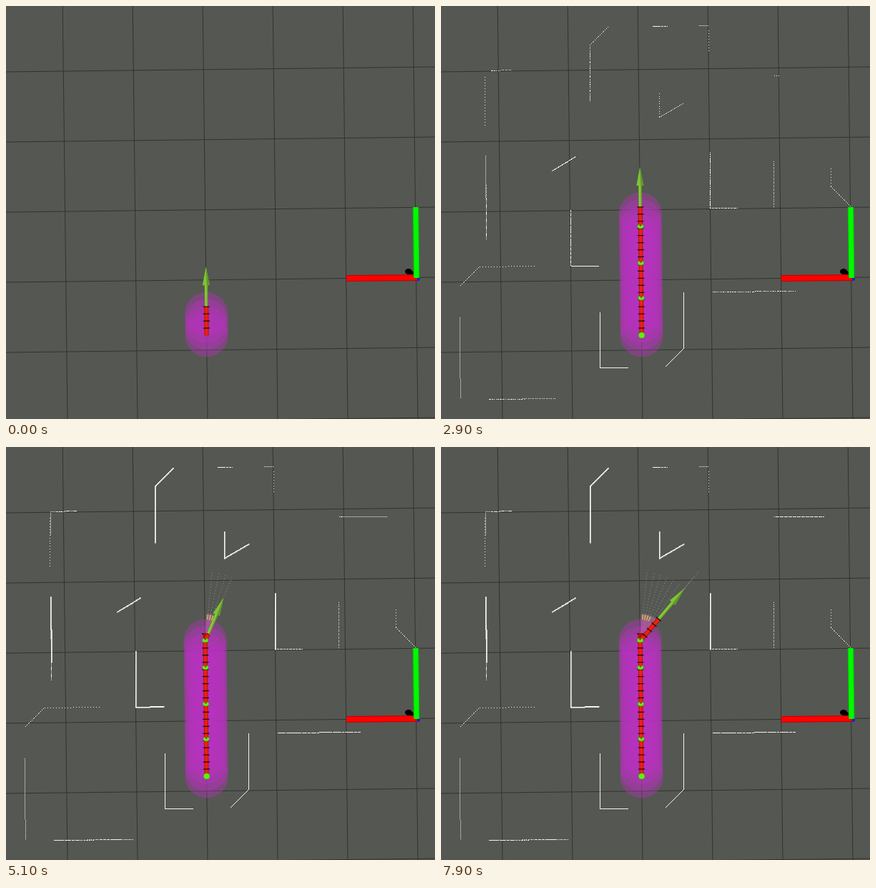
An HTML page with a canvas that plays this animation: 600 by 577 pixels, repeating every 8000 ms.

```html
<!DOCTYPE html>
<html>
<head>
<meta charset="utf-8">
<style>
html, body { margin: 0; width: 600px; height: 577px; overflow: hidden; background: #555752; }
canvas { display: block; }
</style>
</head>
<body>
<canvas id="stage" width="600" height="577"></canvas>
<script>
const ctx = document.getElementById('stage').getContext('2d');
const LOOP = 8000, STEP = 10, RAD = 0.1;
const scans = [];

// A dotted polyline that shows up at a given time
function scan(time, gap, pts, size = 1) {
  scans.push({ time, gap, pts, size });
}

const T1 = 500, T2 = 1450, T3 = 2450, T4 = 4300, T5 = 5600;
scan(T1, 2.5, [208, 54, 234, 28]);
scan(T1, 4, [208, 66, 208, 133]);
scan(T1, 2, [296, 28, 312, 28]);
scan(T1, 2, [361, 27, 373, 27]);
scan(T1, 4, [374, 34, 374, 64]);
scan(T1, 4, [61, 99, 61, 134]);
scan(T1, 3, [71, 90, 77, 90]);
scan(T1, 2, [305, 155, 339, 135]);
scan(T1, 1.5, [155, 230, 188, 210]);
scan(T1, 2.5, [63, 250, 63, 325]);
scan(T1, 2.5, [27, 390, 52, 365]);
scan(T1, 4, [54, 364, 130, 363]);
scan(T1, 2.5, [181, 287, 181, 332]);
scan(T1, 1, [182, 363, 220, 363]);
scan(T1, 2, [26, 435, 26, 491]);
scan(T1, 1, [222, 428, 222, 505, 261, 505]);
scan(T1, 1, [339, 400, 339, 478, 313, 504]);
scan(T1, 2.5, [376, 204, 376, 282]);
scan(T1, 1.3, [376, 282, 414, 282]);
scan(T1, 2.5, [465, 217, 465, 280]);
scan(T1, 4, [545, 227, 545, 252]);
scan(T1, 2.5, [545, 252, 572, 279]);

scan(T2, 4, [61, 134, 61, 167]);
scan(T2, 3.5, [305, 122, 305, 155]);
scan(T2, 1.2, [181, 285, 181, 363]);
scan(T2, 1, [155, 230, 188, 210]);
scan(T2, 3.5, [380, 399, 495, 398]);
scan(T2, 2, [26, 491, 27, 548]);
scan(T2, 3, [68, 549, 117, 549]);

scan(T3, 2, [62, 209, 63, 325]);
scan(T3, 2.5, [70, 90, 99, 89]);
scan(T3, 1.3, [296, 28, 316, 28]);
scan(T3, 2.5, [208, 54, 208, 133]);
scan(T3, 3, [466, 97, 473, 97]);
scan(T3, 2.5, [67, 549, 161, 548]);
scan(T3, 1.5, [376, 204, 376, 282]);
scan(T3, 2.5, [380, 399, 495, 398]);

scan(T4, 2, [62, 122, 62, 90, 99, 89]);
scan(T4, 1, [62, 209, 63, 300], 1.6);
scan(T4, 1, [208, 133, 208, 54, 234, 28], 1.6);
scan(T4, 1, [305, 118, 305, 155, 339, 135], 1.5);
scan(T4, 1, [155, 230, 188, 210], 1.4);
scan(T4, 1, [181, 285, 181, 363, 220, 362], 1.5);
scan(T4, 1, [376, 204, 376, 282], 1.6);
scan(T4, 2, [466, 97, 533, 97]);
scan(T4, 1.3, [380, 399, 495, 398]);
scan(T4, 1.7, [68, 549, 178, 548]);
scan(T5, 1.5, [466, 97, 535, 97]);

const nodes = [[460, T1], [408, T1], [359, T2], [308, T3], [270, T4]];
const pathX = y => 280.6 - (460 - y) * 0.0106;
const pivot = { x: 278.6, y: 271 };

function line(x1, y1, x2, y2, color, width) {
  ctx.strokeStyle = color;
  ctx.lineWidth = width;
  ctx.beginPath();
  ctx.moveTo(x1, y1);
  ctx.lineTo(x2, y2);
  ctx.stroke();
}

function oval(x, y, rx, ry, color) {
  ctx.fillStyle = color;
  ctx.beginPath();
  ctx.ellipse(x, y, rx, ry, 0, 0, 7);
  ctx.fill();
}

function poly(color, ...p) {
  ctx.fillStyle = color;
  ctx.beginPath();
  for (let i = 0; i < p.length; i += 2) ctx.lineTo(p[i], p[i + 1]);
  ctx.fill();
}

// Draw in a frame whose up axis points along the heading
function at(pose, draw) {
  ctx.save();
  ctx.translate(pose.x, pose.y);
  ctx.rotate(pose.a);
  draw();
  ctx.restore();
}

// Poses are kept every 10 px of travel or every 0.1 rad of turn
function posesAt(t) {
  const up = Math.min(16, Math.floor(t / 200));
  const turns = t < 4100 ? 0 : Math.min(7, 1 + Math.floor((t - 4100) / 310));
  const ahead = t < 7100 ? 0 : Math.min(3, 1 + Math.floor((t - 7100) / 300));
  const poses = [];
  for (let i = 0; i <= 3 + up; i++) {
    const y = 460 - i * 9.95;
    poses.push({ x: pathX(y), y, a: -0.0106, disc: true });
  }
  for (let k = 1; k <= turns; k++) poses.push({ ...pivot, a: k * RAD, turn: k });
  for (let i = 1; i <= ahead; i++) {
    const a = 7 * RAD, d = i * STEP;
    poses.push({ x: pivot.x + d * Math.sin(a), y: pivot.y - d * Math.cos(a), a, turn: 7 + i });
  }
  return poses;
}

function drawGrid() {
  ctx.fillStyle = '#555752';
  ctx.fillRect(0, 0, 600, 577);
  for (let i = 0; i < 6; i++) {
    const x = 79.2 + i * 98, y = 92 + i * 98;
    line(x, 0, x + 6.8, 577, '#31332f', 1);
    line(0, y, 600, y - 7, '#31332f', 1);
  }
}

function drawAxes() {
  oval(563, 371, 5, 4, '#000');
  oval(567, 373, 3, 3, '#000');
  oval(576, 381, 3, 3, '#1020e0');
  line(476, 380.6, 575, 379.4, '#c80000', 9);
  line(476, 380.6, 575, 379.4, '#ff0000', 6.5);
  line(573, 281, 574.2, 380, '#00c800', 8.5);
  line(573, 281, 574.2, 380, '#00fa00', 6);
}

function drawScans(t) {
  ctx.fillStyle = '#f4f4f4';
  for (const s of scans) {
    if (t < s.time) continue;
    for (let i = 0; i + 3 < s.pts.length; i += 2) {
      const [x, y, x2, y2] = s.pts.slice(i, i + 4);
      const len = Math.hypot(x2 - x, y2 - y);
      for (let d = 0; d <= len; d += s.gap) {
        const u = d / len;
        ctx.fillRect(Math.round(x + (x2 - x) * u), Math.round(y + (y2 - y) * u), s.size, s.size);
      }
    }
  }
}

function drawRay(p) {
  at(p, () => {
    ctx.fillStyle = 'rgba(165,165,160,0.75)';
    for (let d = 36; d < 97; d += 4) ctx.fillRect(-0.5, -d, 1, 1);
    if (p.turn > 7) return;
    poly('rgba(225,120,190,0.28)', -3, -38, 3, -38, 0.5, -10, -0.5, -10);
    if (p.turn < 5) line(0, -30, 0, -37, '#e0d040', 1.2);
  });
}

function drawArrow(p) {
  at(p, () => {
    line(0, -9.5, 0, -41, '#6fa72a', 4.5);
    line(-0.5, -9.5, -0.5, -41, '#86cf38', 2.2);
    poly('#7cc531', -5, -40, 0, -66, 5, -40);
    poly('#63962a', 1, -40, 0, -66, 5, -40);
  });
}

function render(t) {
  drawGrid();
  drawScans(t);
  drawAxes();
  const poses = posesAt(t);
  const last = poses[poses.length - 1];
  for (const p of poses) if (p.disc) oval(p.x, p.y, 30.3, 30.3, 'rgba(185,48,192,0.4)');
  for (const p of poses) if (p.turn) drawRay(p);
  drawArrow(last);
  for (const p of poses) {
    at(p, () => {
      line(0, 0.5, 0, -STEP, '#a81408', 6);
      line(0, 0.5, 0, -STEP, '#f02010', 4);
    });
  }
  for (const p of poses) {
    if (p.turn && p.turn < 7) at(p, () => line(-2.5, -STEP, 2.5, -STEP, '#b01808', 1.5));
    else at(p, () => line(-4.5, -STEP, 4.5, -STEP, '#2c0a06', 1.3));
  }
  nodes.forEach(([y, time], i) => {
    if (t < time) return;
    const x = pathX(y);
    oval(x, y, 4.7, i ? 3.3 : 4.5, '#4aa010');
    oval(x, y, 4, i ? 2.6 : 3.8, '#5ef010');
    if (i) line(x, y - 3, x, y - 0.5, '#c02010', 2.5);
  });
}

const start = performance.now();
function tick() {
  render((performance.now() - start) % LOOP);
  requestAnimationFrame(tick);
}
tick();
</script>
</body>
</html>
```
